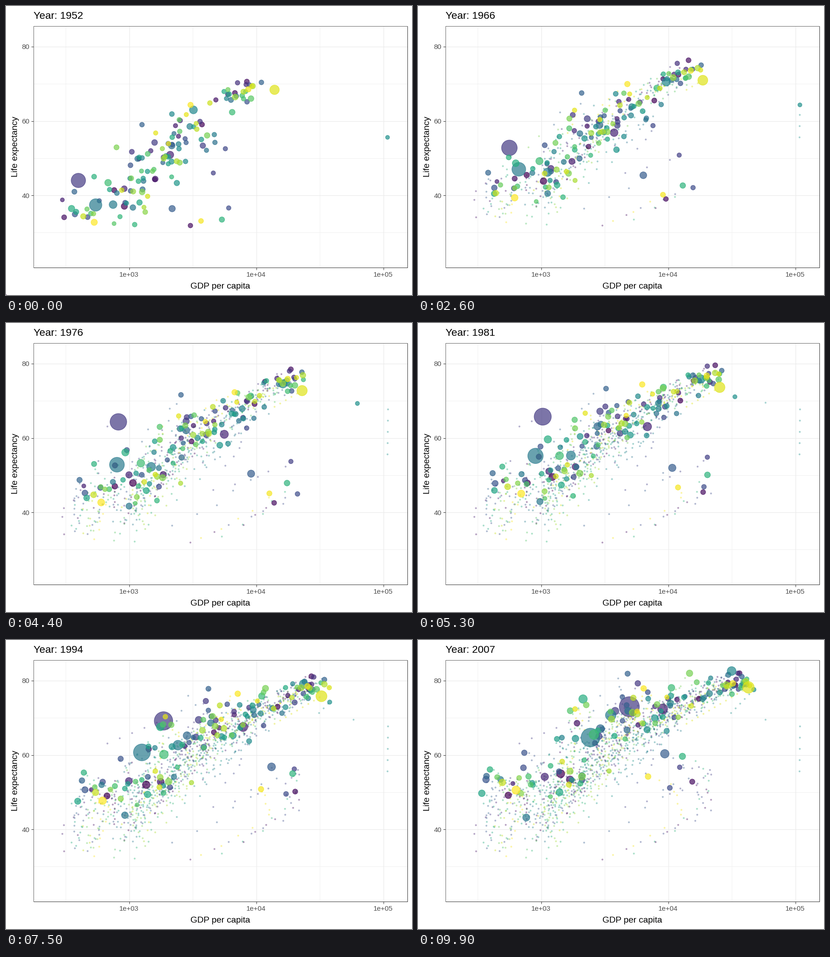
Animation, 885 px wide and 632 px high, one loop 10 s. Source, as a matplotlib script:

```python
import numpy as np
import matplotlib.pyplot as plt
from matplotlib.animation import FuncAnimation

W, H, DPI = 885, 632, 100
PX = 72 / DPI            # points per pixel
FRAMES, STEP = 100, 9    # nine frames between two surveys
YEARS = np.arange(52, 108, 5)
N = 142
LEFT, RIGHT, TOP, BOTTOM = 60, 875, 43.5, 571.5
MID_X, MID_Y = (LEFT + RIGHT) / 2, (TOP + BOTTOM) / 2
GRID, DARK, GREY = "#EBEBEB", "#333333", "#4D4D4D"

plt.rcParams["font.family"] = "Liberation Sans"
rng = np.random.default_rng(52)

# The bubbles that stand out by colour rank: population in millions at
# both ends, then key points (year, income, life expectancy).
LANDMARKS = {
    24: (556, 1319, [(52, 400, 44), (57, 576, 50.5), (62, 488, 44.5),
                     (72, 677, 63.1), (92, 1656, 68.7), (107, 4959, 73)]),
    58: (372, 1110, [(52, 547, 37.4), (72, 724, 50.7), (92, 1164, 60.2),
                     (107, 2452, 64.7)]),
    134: (158, 301, [(52, 13990, 68.4), (107, 42952, 78.2)]),
    59: (82, 224, [(52, 750, 37.5), (107, 3541, 70.7)]),
    14: (57, 190, [(52, 2109, 50.9), (82, 7031, 63.3), (107, 9066, 72.4)]),
    66: (86, 127, [(52, 3217, 63), (72, 14779, 73.4), (107, 31656, 82.6)]),
    97: (41, 169, [(52, 685, 43.4), (107, 2606, 65.5)]),
    71: (.16, 2.5, [(52, 108382, 55.6), (72, 109348, 67.7),
                    (82, 31354, 71.3), (107, 47307, 77.6)]),
}

# Everyone else: count, mean log income and life at the start and the end,
# relative spread, extra log income halfway.
GROUPS = [
    (24, 3.88, 67.8, 4.51, 79.6, .35, .08),
    (10, 3.50, 61.5, 4.02, 75.0, .5, .15),
    (26, 3.40, 53.0, 3.83, 73.0, 1, .06),
    (9, 3.35, 54.0, 4.38, 77.5, .8, .05),
    (23, 3.05, 44.0, 3.50, 68.5, 1, .08),
    (36, 2.86, 38.3, 3.00, 53.0, .85, .06),
    (6, 3.68, 38.5, 3.95, 57.0, .8, .4),
]

u = np.linspace(0, 1, len(YEARS))
hump = 4 * u * (1 - u)
log_gdp, life, pop = np.zeros((3, len(YEARS), N))


def place(rank, p0, p1, x, y):
    log_gdp[:, rank], life[:, rank] = x, y
    pop[:, rank] = p0 * (p1 / p0) ** u


def course(start, end, bulge, noise):
    """Steady drift with a bulge halfway and some wandering."""
    shake = noise * rng.normal(size=len(u)) * np.sqrt(hump)
    return start + (end - start) * u + bulge * hump + shake


for rank, (p0, p1, path) in LANDMARKS.items():
    year, gdp, age = np.transpose(path)
    place(rank, p0, p1, np.interp(YEARS, year, np.log10(gdp)),
          np.interp(YEARS, year, age))

free = iter(rng.permutation([r for r in range(N) if r not in LANDMARKS]))
for count, g0, l0, g1, l1, spread, rise in GROUPS:
    dg, dl = .28 * spread, 6 * spread
    for _ in range(count):
        a, b, c, d = np.clip(rng.normal(size=4), -2, 2)
        x = course(g0 + dg * a, g1 + dg * (.6 * a + .8 * c), rise, .035)
        y = course(l0 + dl * (.5 * a + .8 * b),
                   l1 + dl * (.4 * b + .4 * c + .6 * d), 2.5, .5)
        p0 = np.clip(5 * np.exp(1.1 * rng.normal()), .1, 40)
        growth = 1.3 if l0 > 60 else rng.uniform(2.2, 3.4)
        place(next(free), p0, p0 * growth,
              np.maximum(x, 2.42), np.clip(y, 28.8, 82))

spots = np.stack([268 + 277 * (log_gdp - 3), 89 + 8.125 * (80 - life)], -1)
sizes = 2 + 10 * np.sqrt(np.clip(pop / 1319, 0, 1))


def area(size):
    """Marker area of a dot whose size is given in millimetres."""
    return (.9 * (size * 2.845 + .945)) ** 2


def tint(alpha):
    colours = plt.cm.viridis(np.linspace(0, 1, N))
    colours[:, 3] = alpha
    return colours


fig = plt.figure(figsize=(W / DPI, H / DPI), dpi=DPI, facecolor="white")
ax = fig.add_axes([0, 0, 1, 1])
ax.set(xlim=(0, W), ylim=(H, 0))
ax.axis("off")


def line(xs, ys, colour, width=1, z=1):
    ax.plot(xs, ys, color=colour, lw=width * PX, zorder=z,
            solid_capstyle="butt")


def label(x, y, text, size, colour="black", **kw):
    return ax.text(x, y, text, fontsize=size * PX, color=colour,
                   va="baseline", **kw)


def scatter(size, alpha, z):
    return ax.scatter(*spots[0].T, s=area(size), c=tint(alpha), zorder=z,
                      edgecolors="face", linewidths=1.18 * PX)


for k in range(3):
    x, y = 268.5 + 277 * k, 89 + 162.5 * k
    line((x - 138.5, x - 138.5), (TOP, BOTTOM), GRID, .7)
    line((LEFT, RIGHT), (y + 81.25, y + 81.25), GRID, .7)
    line((x, x), (TOP, BOTTOM), GRID, 1.3)
    line((LEFT, RIGHT), (y, y), GRID, 1.3)
    line((x, x), (BOTTOM, BOTTOM + 5), DARK)
    line((LEFT - 5, LEFT), (y, y), DARK)
    label(x, 592, f"1e+0{k + 3}", 15, GREY, ha="center")
    label(51.5, y + 5.5, str(80 - 20 * k), 15, GREY, ha="right")

line((LEFT, LEFT, RIGHT), (BOTTOM, TOP, TOP), "#666666", z=5)
line((LEFT, RIGHT, RIGHT), (BOTTOM, BOTTOM, TOP), DARK, z=5)

label(MID_X, 617.5, "GDP per capita", 19.1, ha="center")
label(25, MID_Y, "Life expectancy", 19.1, ha="center", rotation=90,
      rotation_mode="anchor")
title = label(LEFT, 28, "", 22.5)

trail = scatter(.5, .3, 3)
dots = scatter(sizes[0], .7, 4)


def blend(table, i):
    k, part = divmod(i, STEP)
    after = min(k + 1, len(table) - 1)
    return table[k] + (table[after] - table[k]) * part / STEP


def draw(i):
    title.set_text(f"Year: {round(1952 + 5 * i / STEP)}")
    dots.set_offsets(blend(spots, i))
    dots.set_sizes(area(blend(sizes, i)))
    past = -(-i // STEP)  # surveys already left behind
    trail.set_offsets(spots[:past].reshape(-1, 2))
    return title, trail, dots


anim = FuncAnimation(fig, draw, frames=FRAMES, interval=100, repeat=True)
plt.show()
```
